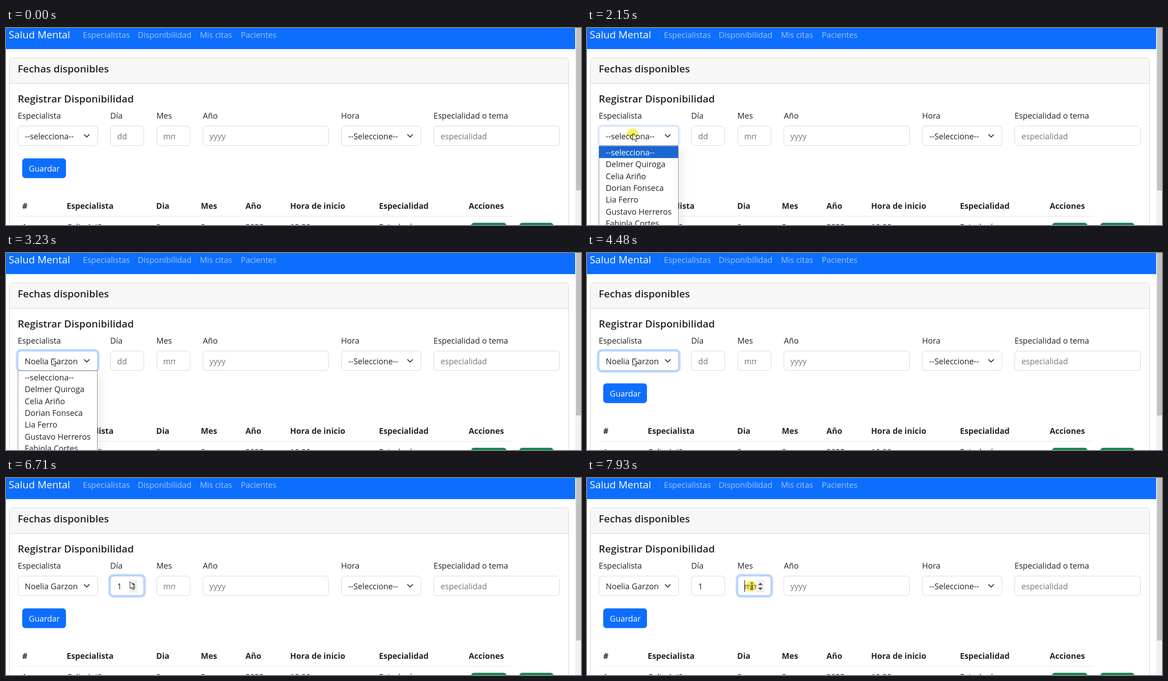
An HTML page that plays this animation: 1275 by 439 pixels, repeating every 8 s.

```html
<!DOCTYPE html>
<html lang="es">
<head>
<meta charset="utf-8">
<title>Fechas disponibles</title>
<style>
  html, body { margin: 0; width: 100%; height: 100%; overflow: hidden; background: #fff; }
  svg { display: block; }
  text { font: 17.8px "Open Sans", "Noto Sans", sans-serif; fill: #212529; white-space: pre; }
  .brand { font-size: 22.4px; fill: #fff; }
  .link { fill: rgba(255, 255, 255, .6); }
  .title { font-size: 22.3px; font-weight: 600; }
  .head { font-weight: 700; }
  .hint { fill: #75797d; }
  .light { fill: #fff; }
  .chevron { fill: none; stroke: #343a40; stroke-width: 2; stroke-linecap: round; stroke-linejoin: round; }
  #popup { filter: drop-shadow(7px 7px 11px rgba(0, 0, 0, .07)); }
  #click { fill: #faf15e; mix-blend-mode: multiply; }
</style>
</head>
<body>
<svg id="stage" width="1275" height="439" viewBox="0 0 1275 439"></svg>
<script>
const LOOP = 8000;
const stage = document.getElementById('stage');

function add(tag, attrs = {}, parent = stage) {
  const el = document.createElementNS('http://www.w3.org/2000/svg', tag);
  for (const key in attrs) el.setAttribute(key, attrs[key]);
  parent.append(el);
  return el;
}
const box = (x, y, width, height, fill, more = {}, parent) =>
  add('rect', { x, y, width, height, fill, ...more }, parent);
const path = (d, more, parent) => add('path', { d, ...more }, parent);
function label(x, y, str, cls = '', parent) {
  const el = add('text', { x, y, class: cls }, parent);
  el.textContent = str;
  return el;
}
const show = (el, on) => el.setAttribute('visibility', on ? 'visible' : 'hidden');
const display = (el, on) => { el.style.display = on ? '' : 'none'; };

// Text cut off at the inner edge of its field
function clipped(x, width, str, cls) {
  const view = add('svg', { x, y: 220, width, height: 40, overflow: 'hidden' });
  return label(0, 28, str, cls, view);
}

function field(x, width) {
  const shape = { x, y: 218.5, width, height: 43.5, rx: 7 };
  const glow = add('rect', { ...shape, fill: 'none', stroke: '#c2dbfe', 'stroke-width': 9.4, opacity: 0 });
  add('rect', { ...shape, fill: '#fff', stroke: '#ced4da' });
  const edge = add('rect', { ...shape, fill: 'none', stroke: '#86b7fe', opacity: 0 });
  return level => {
    glow.setAttribute('opacity', level);
    edge.setAttribute('opacity', Math.min(1, level * 2));
  };
}

const chevron = x => path(`M${x - 5.5} 237.5l5.5 5.5 5.5-5.5`, { class: 'chevron' });

function spinner(x) {
  const g = add('g');
  box(x, 227, 18, 28, '#efefef', {}, g);
  const pressed = box(x, 227, 18, 14, '#666', { visibility: 'hidden' }, g);
  path(`M${x + 4} 238.5h10l-5-5zM${x + 4} 244.5h10l-5 5z`, { fill: '#444' }, g);
  return { g, pressed };
}

// Page
box(0, 0, 1262, 47, '#0d6efd');
label(6, 23, 'Salud Mental', 'brand');
[[170.5, 'Especialistas'], [292, 'Disponibilidad'], [430, 'Mis citas'], [520.5, 'Pacientes']]
  .forEach(([x, str]) => label(x, 22, str, 'link'));
box(7.5, 66.5, 1240, 400, '#fff', { rx: 7, stroke: '#d2d3d4' });
path('M8 123.5V74a7 7 0 0 1 7-7H1240a7 7 0 0 1 7 7V123.5z', { fill: '#f7f7f7' });
box(8, 123, 1239, 1, '#d2d3d4');
label(26, 99, 'Fechas disponibles', 'title');
label(26, 166, 'Registrar Disponibilidad', 'title');
box(1262, 0, 13, 439, '#f1f1f1');
box(1264, 0, 11, 362, '#c1c1c1');

// Form
[[26, 'Especialista'], [231, 'Día'], [333.5, 'Mes'], [436.5, 'Año'], [743, 'Hora'],
 [948, 'Especialidad o tema']].forEach(([x, str]) => label(x, 202, str));
const [focusName, focusDay, focusMonth] =
  [[26.5, 176.5], [231.5, 74], [334.5, 73.5], [436.5, 278.5], [743.5, 176.5], [948.5, 279]]
    .map(([x, w]) => field(x, w));
const nameText = clipped(41.5, 118, '');
const dayText = clipped(246.5, 27, '');
clipped(348.5, 27.5, 'mm', 'hint');
clipped(451, 240, 'yyyy', 'hint');
clipped(759, 120, '--Seleccione--');
clipped(963.5, 240, 'especialidad', 'hint');
chevron(179);
chevron(896);
box(36, 290.5, 97, 44, '#0d6efd', { rx: 7 });
label(50.5, 320, 'Guardar', 'light');

// Table
[[36, '#'], [134.5, 'Especialista'], [333, 'Dia'], [432, 'Mes'], [531, 'Año'],
 [630, 'Hora de inicio'], [827, 'Especialidad'], [1026, 'Acciones']]
  .forEach(([x, str]) => label(x, 403, str, 'head'));
box(26, 419, 1098, 1, '#dee2e6');
[[36, '1'], [134.5, 'Celia Ariño'], [333, '9'], [432, '9'], [531, '2023'], [630, '10:00'],
 [827, 'Psicología']].forEach(([x, str]) => label(x, 450, str));
box(1031, 434, 79, 44, '#198754', { rx: 7 });
box(1138, 434, 76, 44, '#198754', { rx: 7 });

// Option list
const names = ['--selecciona--', 'Delmer Quiroga', 'Celia Ariño', 'Dorian Fonseca', 'Lia Ferro',
  'Gustavo Herreros', 'Fabiola Cortes', 'Noelia Garzon'];
const ROW = 26.35;
const popup = add('g', { id: 'popup' });
box(26.5, 262.5, 176, 190, '#fff', { stroke: '#858585' }, popup);
const options = add('g', {}, popup);
const bar = box(27, 0, 175, 26.5, '#1967d2', {}, options);
const rows = names.map((str, i) => label(41.5, 284 + i * ROW, str, '', options));

// Carets, spin buttons, pointer
const daySpin = spinner(273);
const monthSpin = spinner(375.5);
const caret = box(0, 228, 1.2, 26, '#111');
const click = add('circle', { id: 'click', r: 12 });
const arrow = path('M0 0V15.5L3.6 12.2 6.3 18 9 16.8 6.4 11.2H11.3Z',
  { fill: '#fff', stroke: '#111', 'stroke-linejoin': 'round' });
const beam = path('M-3.5-7.5h2.5l1 1 1-1h2.5M0-6.5V6.5M-3.5 7.5h2.5l1-1 1 1h2.5',
  { fill: 'none', stroke: '#222', 'stroke-width': 1.2 });

// Steps: [time, values...]
const pointer = [
  [0], [250, 690, 240, beam], [330, 563, 225, beam],
  [580, 420, 235, arrow], [650, 318, 226, arrow], [730, 180, 212, arrow], [800, 110, 206, arrow],
  [1060, 108, 214, arrow], [1130, 106, 222, arrow], [1660, 103, 229, arrow], [1730, 101.5, 235, arrow],
  [5140, 108, 230, arrow], [5210, 150, 217, arrow], [5280, 215, 211, arrow], [5350, 310, 224, arrow],
  [5410, 323, 230, arrow], [5480, 290, 228, arrow], [5550, 277.5, 226, arrow],
  [6310, 277, 227, arrow], [6460, 276, 229, arrow], [6610, 275, 231, arrow],
  [7310, 280, 231, arrow], [7380, 302, 236, beam], [7450, 322, 230, arrow],
  [7520, 350, 239, beam], [7590, 365.5, 241, beam]
];
const chosen = [[0, 0], [2490, 1], [3000, 3], [3090, 4], [3160, 5], [3230, 7]];
const nameGlow = [[0, 0], [2150, .3], [2210, .7], [2290, 1], [5750, .8], [5820, .4], [5890, .1], [5960, 0]];
const dayGlow = [[0, 0], [5750, .1], [5820, .35], [5890, .75], [5960, 1], [7790, .6], [7860, .25], [7930, 0]];
const monthGlow = [[0, 0], [7790, .2], [7860, .6], [7930, 1]];
const clicks = [[0], [2000, 101, 236], [2290], [5750, 278, 227], [5890], [7790, 364, 241]];
const carets = [[0], [5750, 256], [6310], [6810, 256], [7310], [7790, 349]];

const at = (steps, t) => steps.findLast(step => step[0] <= t).slice(1);
const within = (t, from, to) => t >= from && t < to;

function draw(t) {
  const [x, y, shape] = at(pointer, t);
  for (const el of [arrow, beam]) show(el, el === shape);
  if (shape) shape.setAttribute('transform', `translate(${x} ${y})`);

  const [cx, cy] = at(clicks, t);
  show(click, cx);
  if (cx) {
    click.setAttribute('cx', cx);
    click.setAttribute('cy', cy);
  }

  const [caretX] = at(carets, t);
  show(caret, caretX);
  if (caretX) caret.setAttribute('x', caretX);

  const [pick] = at(chosen, t);
  nameText.textContent = names[pick];
  bar.setAttribute('y', 263.3 + pick * ROW);
  rows.forEach((row, i) => row.setAttribute('class', i === pick ? 'light' : ''));
  display(popup, within(t, 2000, 4480));
  display(options, t >= 2150);

  dayText.textContent = t < 5750 ? 'dd' : '1';
  dayText.setAttribute('class', t < 5750 ? 'hint' : '');
  focusName(at(nameGlow, t)[0]);
  focusDay(at(dayGlow, t)[0]);
  focusMonth(at(monthGlow, t)[0]);

  display(daySpin.g, within(t, 5480, 7790));
  show(daySpin.pressed, within(t, 5750, 5890));
  display(monthSpin.g, t >= 7520);
}

const start = performance.now();
function tick() {
  draw((performance.now() - start) % LOOP);
  requestAnimationFrame(tick);
}
tick();
</script>
</body>
</html>
```
